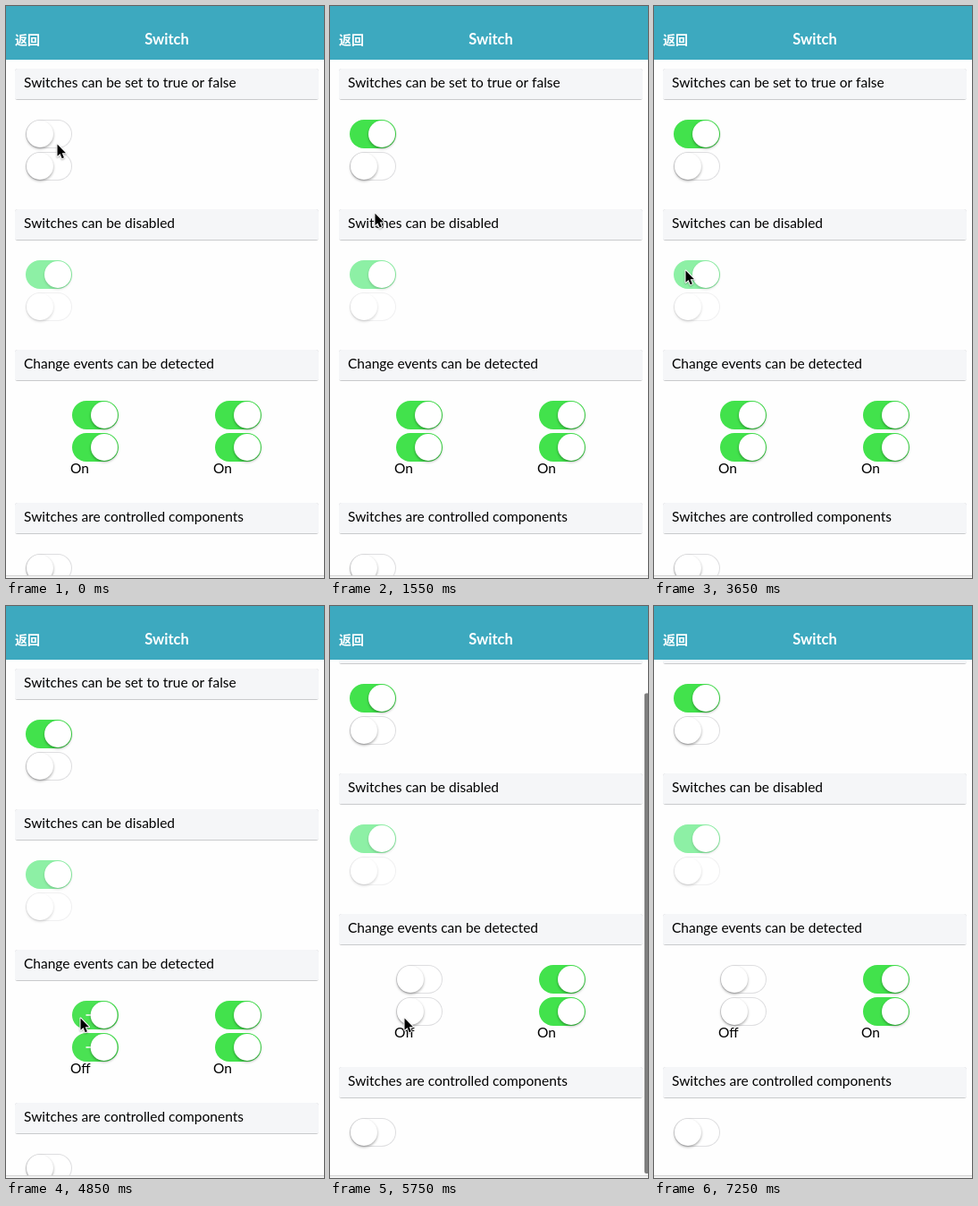
These frames come from a looping animation (356 px wide and 639 px high, 8000 ms). An HTML page with a canvas:

```html
<!DOCTYPE html>
<html lang="en">
<head>
<meta charset="utf-8">
<title>Switch</title>
<style>
  html, body { margin: 0; width: 100%; height: 100%; overflow: hidden; background: #fefefe; }
  canvas { display: block; width: 356px; height: 639px; }
</style>
</head>
<body>
<canvas id="stage"></canvas>
<script>
const W = 356, H = 639, LOOP = 8000, STEP = 150, PHASE = 50;
const TOP = 60, BOTTOM = 636, SCROLL = 40;
const ON = { knob: 1, fill: 1 }, OFF = { knob: 0, fill: 0 };
const ACTIVE = { on: [66, 226, 76], off: [222, 222, 224], shadow: 0.35 };
const DISABLED = { on: [141, 240, 165], off: [240, 240, 241], shadow: 0.17 };

// Places the pointer visits, with its time of arrival
const stops = [
  { at: 500, x: 61, y: 147 },
  { at: 1850, x: 38, y: 323 },
  { at: 2300, x: 53, y: 334 },
  { at: 2900, x: 37, y: 286 },
  { at: 3650, x: 35, y: 295 },
  { at: 4550, x: 83, y: 460 },
  { at: 6500, x: 51, y: 587 }
];

const canvas = document.getElementById('stage');
const ctx = canvas.getContext('2d');
const dpr = window.devicePixelRatio || 1;
canvas.width = W * dpr;
canvas.height = H * dpr;

const mix = (a, b, u) => a + (b - a) * u;

function ease(t, start, duration) {
  const u = Math.min(1, Math.max(0, (t - start) / duration));
  return u * u * (3 - 2 * u);
}

// Longer glides take more time
function pointerAt(t) {
  const p = { x: 57, y: 154 };
  for (const { at, x, y } of stops) {
    const glide = 140 + 2.5 * Math.hypot(x - p.x, y - p.y);
    const u = ease(t, at - glide, glide);
    p.x = mix(p.x, x, u);
    p.y = mix(p.y, y, u);
    if (u < 1) break;
  }
  return p;
}

// The fill changes faster than the knob slides
function flip(t, onAt, offAt) {
  const level = duration => ease(t, onAt, duration) - ease(t, offAt, duration);
  return { knob: level(250), fill: level(150) };
}

function pill(x, y, w, h, r, fill) {
  ctx.fillStyle = fill;
  ctx.beginPath();
  ctx.roundRect(x, y, w, h, r);
  ctx.fill();
}

function text(str, x, y, font, color = '#000', align = 'left') {
  ctx.font = font;
  ctx.fillStyle = color;
  ctx.textAlign = align;
  ctx.fillText(str, x, y);
}

const label = (str, x, y) => text(str, x, y, '15.5px Lato, sans-serif');

function section(str, y) {
  pill(10, y, 340, 35, 3, '#c9cacc');
  pill(10, y, 340, 34, [3, 3, 1, 1], '#f5f6f8');
  label(str, 20, y + 21);
}

function toggle(x, y, { knob, fill }, look = ACTIVE) {
  const tint = look.off.map((c, i) => Math.round(mix(c, look.on[i], fill)));
  const inset = 1 + fill * 15;
  pill(x, y, 52, 32, 16, `rgb(${tint})`);
  if (fill < 1) pill(x + inset, y + inset, 52 - 2 * inset, 32 - 2 * inset, 16 - inset, '#fff');
  ctx.save();
  ctx.shadowColor = `rgba(0,0,0,${look.shadow})`;
  ctx.shadowBlur = 3 * dpr;
  ctx.shadowOffsetY = 1.5 * dpr;
  pill(x + 1 + knob * 20, y + 1, 30, 30, 15, '#fff');
  ctx.restore();
}

function arrow({ x, y }) {
  ctx.save();
  ctx.translate(x + 0.5, y + 0.5);
  ctx.lineJoin = 'round';
  ctx.lineWidth = 2;
  ctx.strokeStyle = '#fff';
  ctx.shadowColor = 'rgba(0,0,0,0.3)';
  ctx.shadowBlur = 2 * dpr;
  ctx.shadowOffsetY = dpr;
  const shape = new Path2D('M0 0V13.3L3 10.6L5.2 15.7L7.4 14.7L5.2 9.8H9.5Z');
  ctx.stroke(shape);
  ctx.shadowColor = 'transparent';
  ctx.fillStyle = '#000';
  ctx.fill(shape);
  ctx.restore();
}

function content(t) {
  section('Switches can be set to true or false', 70);
  toggle(22, 127, flip(t, 800, Infinity));
  toggle(22, 163, OFF);

  section('Switches can be disabled', 227);
  toggle(22, 284, ON, DISABLED);
  toggle(22, 320, OFF, DISABLED);

  section('Change events can be detected', 384);
  for (const y of [441, 477]) {
    toggle(74, y, flip(t, -LOOP, 4830));
    toggle(234, y, ON);
  }
  label(t < 4830 ? 'On' : 'Off', 72, 522);
  label('On', 232, 522);

  section('Switches are controlled components', 555);
  toggle(22, 612, flip(t, 6660, 6960));
}

function scrollbar(t, offset) {
  const view = BOTTOM - TOP, ratio = view / (view + SCROLL);
  ctx.globalAlpha = ease(t, 5450, 100) - ease(t, 5950, 250);
  pill(352, TOP + offset * ratio, 5, view * ratio - 2, 2, '#7f7f7f');
  ctx.globalAlpha = 1;
}

function header() {
  ctx.fillStyle = '#3da9bf';
  ctx.fillRect(0, 0, W, TOP);
  text('返回', 10, 43, 'bold 14px "Noto Sans CJK SC", "Noto Sans CJK", sans-serif', '#fff');
  text('Switch', 180, 43, 'bold 16.5px Lato, sans-serif', '#fff', 'center');
}

function footer() {
  ctx.fillStyle = '#f4f4f4';
  ctx.fillRect(0, BOTTOM, W, H - BOTTOM);
  ctx.fillStyle = '#d2d2d2';
  ctx.fillRect(0, BOTTOM, W, 1);
}

function draw(t) {
  const offset = SCROLL * ease(t, 5420, 330);
  ctx.setTransform(dpr, 0, 0, dpr, 0, 0);
  ctx.fillStyle = '#fefefe';
  ctx.fillRect(0, 0, W, H);

  ctx.save();
  ctx.beginPath();
  ctx.rect(0, TOP, W, BOTTOM - TOP);
  ctx.clip();
  ctx.translate(0, -Math.round(offset));
  content(t);
  ctx.restore();

  scrollbar(t, offset);
  header();
  footer();
  if (t < 7250) arrow(pointerAt(t));
}

const start = performance.now();
function tick() {
  const t = (performance.now() - start) % LOOP;
  draw(Math.max(0, Math.floor((t - PHASE) / STEP) * STEP + PHASE));
  requestAnimationFrame(tick);
}
tick();
</script>
</body>
</html>
```
